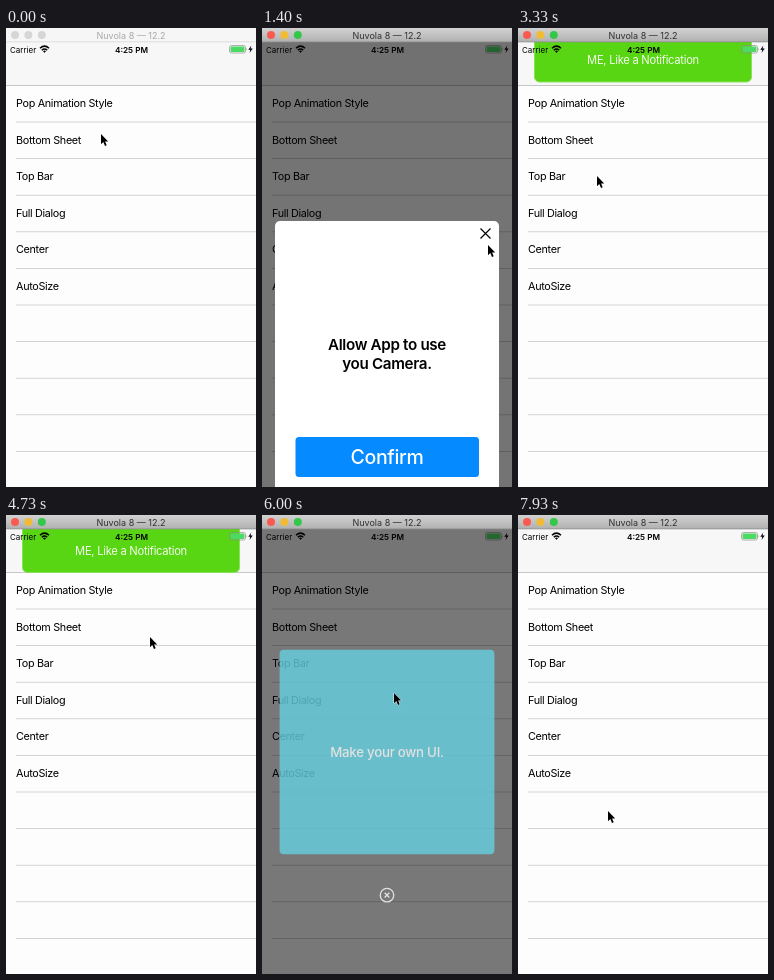
These frames come from a looping animation (250 by 459 pixels, 8 s). An HTML page:

```html
<!DOCTYPE html>
<html lang="en">
<head>
<meta charset="utf-8">
<title>Popup styles</title>
<style>
html, body { margin: 0; width: 100%; height: 100%; overflow: hidden; background: #fff; }
svg { display: block; width: 100%; height: 100%; font-family: Inter, Roboto, sans-serif; }
.mid { text-anchor: middle; }
.row { font-size: 10.8px; letter-spacing: -.32px; }
.head { font-size: 15.2px; font-weight: 600; letter-spacing: -.33px; }
</style>
</head>
<body>
<svg viewBox="0 0 250 459">
  <defs>
    <linearGradient id="chrome" x2="0" y2="1">
      <stop stop-color="#d2d2d2"/><stop offset="1" stop-color="#b0b0b0"/>
    </linearGradient>
  </defs>
  <rect width="250" height="459" fill="#fefdfe"/>
  <rect y="14" width="250" height="43" fill="#f7f7f7"/>
  <rect y="57" width="250" height=".8" fill="#b8b8ba"/>
  <g id="list"></g>

  <g id="bar">
    <rect x="16.5" y="4" width="217" height="53.5" rx="5" fill="#58d513" stroke="#86e356"/>
    <text class="mid" x="125" y="40" fill="#f4fdee" font-size="11.2" letter-spacing="-.27">ME, Like a Notification</text>
  </g>

  <g id="status">
    <text x="4" y="24.5" font-size="8">Carrier</text>
    <g fill="none" stroke="#000" stroke-width="1.5">
      <path d="M34 20.2Q38.500 16 43 20.2M35.800 22.200Q38.500 19.700 41.200 22.200"/>
      <path d="M37.400 23.300L38.500 24.500L39.600 23.300Q38.500 22.400 37.400 23.300Z" stroke-width=".6" fill="#000"/>
    </g>
    <text class="mid" x="125.500" y="24.500" font-size="8.200" font-weight="600">4:25 PM</text>
    <rect x="223.500" y="17.500" width="16" height="7.500" rx="2" fill="none" stroke="#8e8e8e" stroke-width=".7"/>
    <rect x="224.500" y="18.500" width="14" height="5.500" rx="1.200" fill="#4cd964"/>
    <path d="M240.500 20v2.500q1.200-1.200 0-2.500Z" fill="#8e8e8e"/>
    <path d="M245.300 17.500L242.300 21.800H244.300L243.500 25L246.700 20.600H244.600Z"/>
  </g>

  <rect id="dim" y="14" width="250" height="445"/>

  <g id="sheet">
    <rect x="13" y="193" width="224" height="290" rx="5" fill="#fff"/>
    <path d="M218.500 200.500l10 10m0-10l-10 10" stroke="#000" stroke-width="1.200"/>
    <text class="mid head" x="125" y="322">Allow App to use</text>
    <text class="mid head" x="125" y="341.300">you Camera.</text>
    <rect x="33.500" y="409" width="183.500" height="40" rx="3.500" fill="#058aff"/>
    <text class="mid" x="125" y="436.300" fill="#fff" font-size="19.500" font-weight="500" letter-spacing="-.35">Confirm</text>
  </g>

  <g id="dialog">
    <rect x="20" y="137" width="210" height="200" rx="4" fill="#66d2e3"/>
    <text class="mid" x="125" y="241.500" fill="#fff" font-size="13" font-weight="500" letter-spacing="-.25">Make your own UI.</text>
    <g fill="none" stroke="#fff" stroke-width="1.300">
      <circle cx="125" cy="377" r="6.600"/>
      <path d="M122.700 374.700l4.600 4.600m0-4.600l-4.600 4.600"/>
    </g>
  </g>

  <rect id="title" width="250" height="14"/>
  <rect id="edge" y="13.500" width="250" height=".8"/>
  <g id="lights"></g>
  <text id="name" class="mid" x="125" y="10.600" font-size="9">Nuvola 8 — 12.2</text>

  <path id="cursor" d="M0 0V10.200L2.300 8.100L4 12L5.700 11.200L4.100 7.500H7.200Z" stroke="#fff" stroke-width=".8" stroke-linejoin="round" paint-order="stroke"/>
</svg>
<script>
const el = id => document.getElementById(id);
const set = (id, attrs) => {
  for (const k in attrs) el(id).setAttribute(k, attrs[k]);
};
const LOOP = 8000, STEP = 1000 / 15, PITCH = 36.6;

const rows = ['Pop Animation Style', 'Bottom Sheet', 'Top Bar', 'Full Dialog', 'Center', 'AutoSize'];
let list = '';
for (let i = 0; i < 10; i++) {
  const y = 57 + i * PITCH;
  if (rows[i]) list += `<text class="row" x="10" y="${y + 22}">${rows[i]}</text>`;
  list += `<rect x="10" y="${y + PITCH}" width="240" height=".8" fill="#c8c7cc"/>`;
}
el('list').innerHTML = list;

const colors = ['#fb5a52', '#f2bb35', '#35c749'];
el('lights').innerHTML = colors.map((c, i) => `<circle cx="${9 + i * 13.4}" cy="7" r="4"/>`).join('');

const ramp = (t, a, b) => Math.min(1, Math.max(0, (t - a) / (b - a)));
const smooth = p => p * p * (3 - 2 * p);
const out = p => 1 - (1 - p) ** 3;

// time, x, y of the pointer tip
const path = [
  [0, 95, 106], [933, 95, 106], [1400, 226, 217], [1733, 223, 205], [2200, 223, 205],
  [2800, 62, 146], [2867, 62, 146], [3067, 79, 148], [3333, 79, 148], [4133, 144, 122],
  [4733, 144, 122], [5400, 132, 178], [6400, 132, 178], [6933, 124, 396], [7133, 121, 380],
  [7800, 121, 380], [7933, 90, 296], [8000, 90, 296]
];

function pointer(t) {
  const i = Math.max(1, path.findIndex(p => p[0] >= t));
  const [a, x0, y0] = path[i - 1], [b, x1, y1] = path[i];
  const p = smooth(ramp(t, a, b));
  return `translate(${x0 + (x1 - x0) * p} ${y0 + (y1 - y0) * p})`;
}

function draw(t) {
  const active = t > 330;
  set('title', { fill: active ? 'url(#chrome)' : '#f6f6f6' });
  set('edge', { fill: active ? '#8f8f8f' : '#d6d6d6' });
  set('name', { fill: active ? '#303030' : '#a8a8a8' });
  [...el('lights').children].forEach((c, i) => c.setAttribute('fill', active ? colors[i] : '#d6d6d6'));

  // bottom sheet
  const rise = active ? out(ramp(t, 253, 733)) : 0;
  const fall = ramp(t, 1940, 2400);
  set('sheet', { transform: `translate(0 ${270 * (1 - rise + smooth(fall))})` });

  // notification bar: damped drop, then slide away
  const s = (t - 3200) / 1000;
  const drop = -45 * Math.exp(-12 * s) * Math.cos(8.8 * s);
  const leave = ramp(t, 4720, 5050) ** 2;
  set('bar', {
    transform: `translate(0 ${drop - 50 * leave})`,
    visibility: t > 3330 && leave < 1 ? 'visible' : 'hidden'
  });

  // dialog shrinks into place while fading in
  const pop = t > 5790 ? ramp(t, 5720, 6120) : 0;
  const gone = ramp(t, 7400, 7600);
  set('dialog', {
    opacity: smooth(pop) * (1 - gone),
    transform: `translate(125 237) scale(${1 + .105 * (1 - smooth(pop))}) translate(-125 -237)`
  });

  set('dim', { opacity: .54 * (rise * (1 - fall) + out(pop) * (1 - gone)) });
  set('cursor', { transform: pointer(t) });
}

const start = performance.now();
function tick() {
  const t = performance.now() - start;
  draw(Math.floor((t + 4) / STEP) * STEP % LOOP);
  requestAnimationFrame(tick);
}
tick();
</script>
</body>
</html>
```
